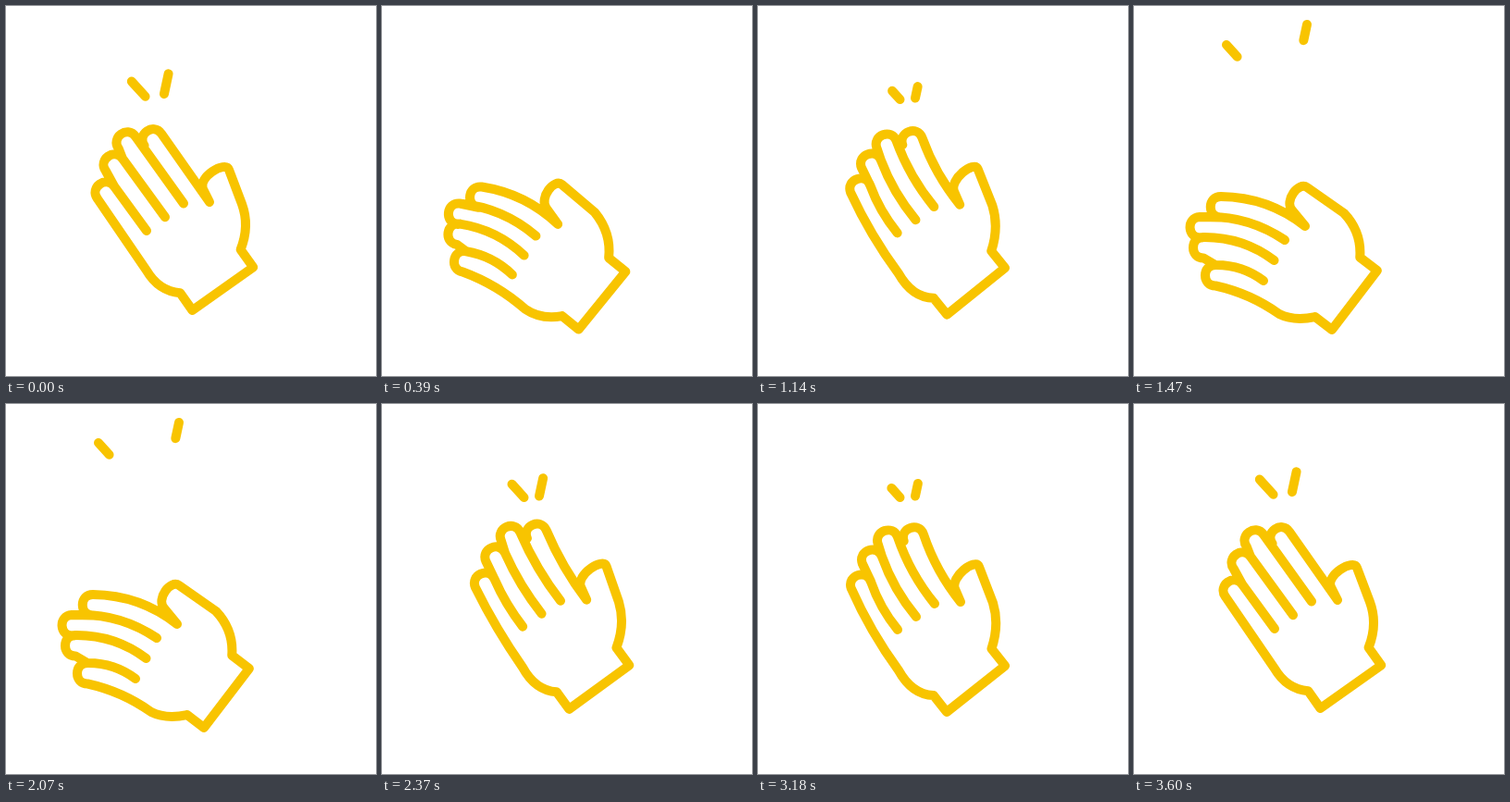
These frames come from a looping animation (400 px wide and 400 px high, 4130 ms). An HTML page:

```html
<!DOCTYPE html>
<html lang="en">
<head>
<meta charset="utf-8">
<title>Clapping hand</title>
<style>
  html, body { margin: 0; width: 100%; height: 100%; overflow: hidden; background: #fff; }
  svg { display: block; width: 100vw; height: 100vh; }
  path { fill: none; stroke: #f8c400; stroke-width: 10; stroke-linecap: round; stroke-linejoin: round; }
</style>
</head>
<body>
<svg viewBox="0 0 400 400">
  <path id="hand"/>
  <path id="sparks"/>
</svg>
<script>
const LOOP = 4130, STEP = 30, CLAP = 600, CLAPS = 5, END = 3600;
const WIDTH = 22.5;

// wrist x, y, angle, finger bend | palm edge, thumb root, thumb right, thumb left |
// finger bases (little, middle, index) | finger tips (little to index)
const REST = [201.5, 329, -35.3, 0,
  152, 286, 255, 214, 241, 177, 213, 198,
  152, 243, 192, 213.5, 220, 212,
  117, 195, 126, 165, 140, 141, 168, 138];
const MID = [210, 347, -47.5, .11,
  152, 317, 236, 221, 208, 188, 189, 214,
  143, 278, 173, 240, 199, 231,
  98, 241, 100, 212, 106, 190, 131, 178];
const OPEN = [214, 350, -52.6, .17,
  157, 333, 227, 224, 187, 196, 171, 221,
  140, 297, 163, 253, 185, 238,
  88, 280, 75, 250, 71, 228, 94, 206];
const WHIP = [204, 333, -38.4, -.09,
  152, 288, 254, 215, 239, 176, 213, 200,
  151, 244, 191, 216, 219, 214,
  122, 192, 134, 165, 151, 144, 179, 141];

const blend = (a, b, k) => a.map((v, i) => v + (b[i] - v) * k);

const keys = [];
for (let i = 0; i < CLAPS; i++) {
  const t = i * CLAP;
  keys.push([t, REST], [t + 150, MID], [t + 270, OPEN], [t + 330, OPEN]);
  if (i < CLAPS - 1) keys.push([t + 460, MID], [t + 545, WHIP]);
}
keys.push([2980, MID], [3180, WHIP], [3330, blend(REST, MID, .25)], [END, REST]);

// Smooth curve through the keys, at rest at both ends
function poseAt(t) {
  if (t >= END) return REST;
  const n = keys.findIndex(k => k[0] > t) - 1;
  const [t0, a] = keys[n], [t1, b] = keys[n + 1];
  const span = t1 - t0, x = (t - t0) / span;
  const slope = (k, i) => k > 0 && k < keys.length - 1
    ? (keys[k + 1][1][i] - keys[k - 1][1][i]) / (keys[k + 1][0] - keys[k - 1][0]) : 0;
  const s = x * x * (3 - 2 * x), p = x * (1 - x) * (1 - x), q = x * x * (x - 1);
  return a.map((v, i) => v + (b[i] - v) * s + span * (p * slope(n, i) + q * slope(n + 1, i)));
}

const move = (p, d, k) => [p[0] + d[0] * k, p[1] + d[1] * k];
const mix = (a, b, k) => [a[0] + (b[0] - a[0]) * k, a[1] + (b[1] - a[1]) * k];
const dir = (a, b) => {
  const x = b[0] - a[0], y = b[1] - a[1], l = Math.hypot(x, y);
  return [x / l, y / l];
};
const side = d => [-d[1], d[0]];
const bow = (a, b, k) =>
  move(mix(a, b, .5), side(dir(a, b)), k * Math.hypot(b[0] - a[0], b[1] - a[1]));
const cmd = (c, ...pts) => c + pts.map(p => p[0].toFixed(2) + ' ' + p[1].toFixed(2)).join(' ');

function handPath(pose) {
  const [wx, wy, angle, bend, ...rest] = pose;
  const pts = [];
  for (let i = 0; i < rest.length; i += 2) pts.push([rest[i], rest[i + 1]]);
  const [palm, root, thumbR, thumbL, b0, b2, b3, ...tips] = pts;
  const bases = [b0, mix(b0, b2, .5), b2, b3];

  const r = angle * Math.PI / 180;
  const e = [Math.cos(r), Math.sin(r)], n = [e[1], -e[0]];
  const w1 = [wx, wy], w2 = move(w1, e, 80.5);
  const n1 = move(w1, n, 23), n2 = move(w2, n, 23.5);

  let d = cmd('M', n1) + cmd('L', w1, w2, n2)
    + cmd('Q', move(move(n2, e, 23), n, 15), root) + cmd('L', thumbR)
    + cmd('C', move(thumbR, dir(root, thumbR), 11), move(thumbL, dir(b3, thumbL), 14), thumbL)
    + cmd('L', b3);

  tips.forEach((tip, k) => {
    const ctrl = bow(bases[k], tip, bend), u = dir(ctrl, tip);
    const left = move(tip, side(u), -WIDTH), cap = WIDTH * .66;
    d += cmd('M', bases[k]) + cmd('Q', ctrl, tip)
      + cmd('C', move(tip, u, cap), move(left, u, cap), left);
    d += k ? cmd('L', tips[k - 1])
      : cmd('Q', bow(palm, left, bend * .6), palm)
        + cmd('Q', move(move(n1, e, -17.7), n, 15), n1);
  });
  return d;
}

const rays = [[[153.5, 101], [100, 42]], [[170, 99.5], [187, 20]]];
const clamp = v => Math.max(0, Math.min(1, v));

// Each spark is a dash that travels outward along its ray
function sparkPath(t) {
  let u = t % CLAP;
  if (t >= END) u = 0;
  else if (t > 3090) u = -115 * ((END - t) / 510) ** 3.8;
  else if (t > 2700 + 200) return '';
  else if (u > 420) u -= CLAP;
  const from = clamp(.055 + .0027 * u), to = clamp(.33 + .0029 * u);
  if (to - from < .01) return '';
  return rays.map(([a, b]) => cmd('M', mix(a, b, from)) + cmd('L', mix(a, b, to))).join('');
}

const hand = document.getElementById('hand');
const sparks = document.getElementById('sparks');
const start = performance.now();

function draw(now) {
  const t = Math.floor(Math.max(0, now - start) % LOOP / STEP) * STEP;
  hand.setAttribute('d', handPath(poseAt(t)));
  sparks.setAttribute('d', sparkPath(t));
  requestAnimationFrame(draw);
}
draw(start);
</script>
</body>
</html>
```
